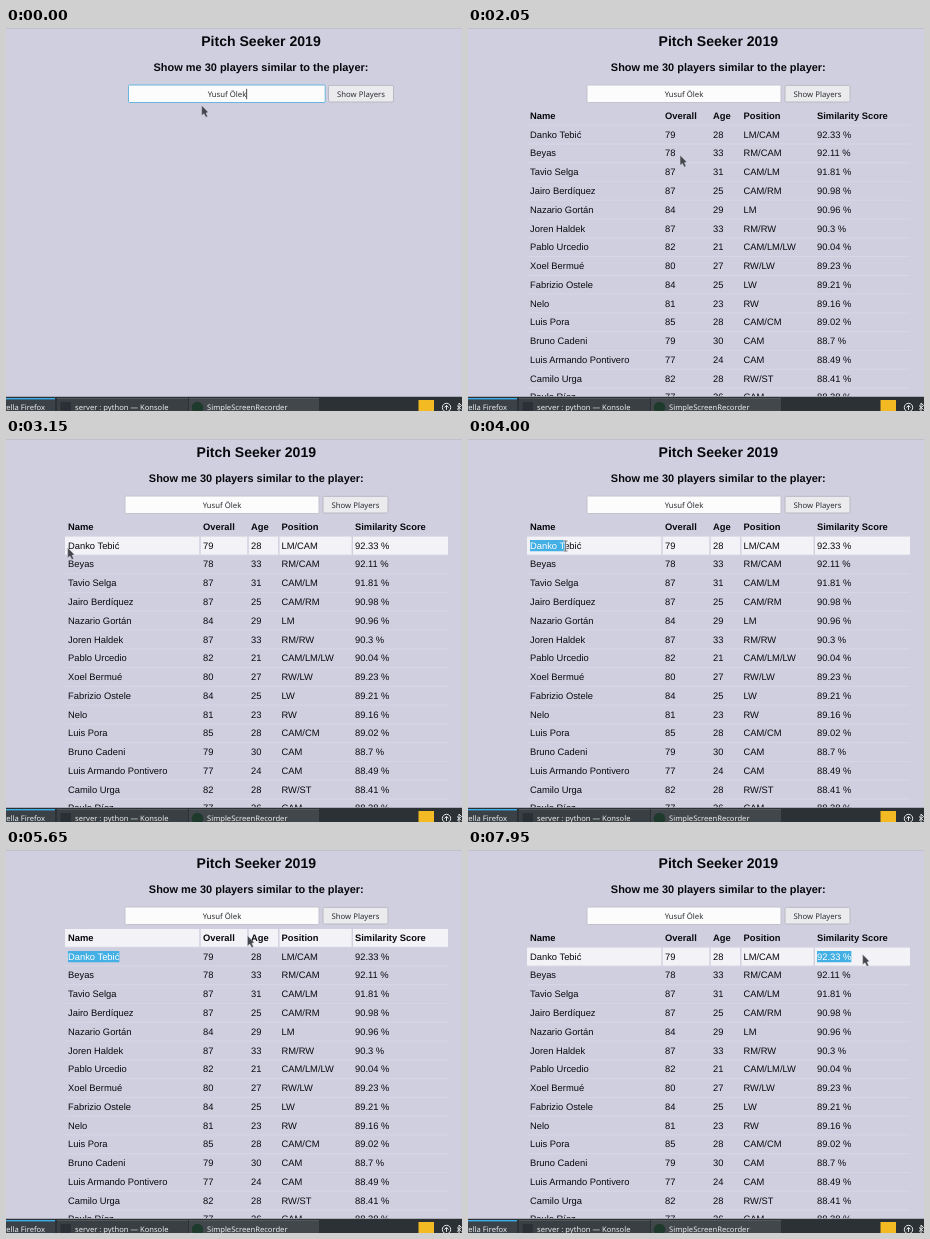
An HTML page for the animation above (8 s loop, 456 by 383 pixels).

```html
<!DOCTYPE html>
<html lang="en">
<head>
<meta charset="utf-8">
<title>Pitch Seeker</title>
<style>
  html, body { margin: 0; width: 100%; height: 100%; overflow: hidden; background: #d0cfe0; }
  #stage { display: block; width: 456px; height: 383px; }
  text {
    font: 9.37px "Liberation Sans", Arial, sans-serif;
    fill: #08080c; white-space: pre; text-rendering: geometricPrecision;
  }
  .bold { font-weight: bold; }
  .title { font-size: 14.05px; }
  .subtitle { font-size: 10.96px; }
  .ui { font: 7.75px "Noto Sans", sans-serif; fill: #2b2f33; }
  .task { font: 7.6px "Noto Sans", sans-serif; fill: #eceeef; }
  .mid { text-anchor: middle; }
  .end { text-anchor: end; }
  .picked text { fill: #fff; }
</style>
</head>
<body>
<svg id="stage" viewBox="0 0 456 383"></svg>
<script>
const DURATION = 8000, STEP = 50;
const BLUR = 800, TABLE = 950, FILL = 2000, HOVER = 2600;
const TOP = 79, FIRST = 97.2, PITCH = 18.77;

const heads = ['Name', 'Overall', 'Age', 'Position', 'Similarity Score'];
const players = `Danko Tebić|79|28|LM/CAM|92.33
Beyas|78|33|RM/CAM|92.11
Tavio Selga|87|31|CAM/LM|91.81
Jairo Berdíquez|87|25|CAM/RM|90.98
Nazario Gortán|84|29|LM|90.96
Joren Haldek|87|33|RM/RW|90.3
Pablo Urcedio|82|21|CAM/LM/LW|90.04
Xoel Bermué|80|27|RW/LW|89.23
Fabrizio Ostele|84|25|LW|89.21
Nelo|81|23|RW|89.16
Luis Pora|85|28|CAM/CM|89.02
Bruno Cadeni|79|30|CAM|88.7
Luis Armando Pontivero|77|24|CAM|88.49
Camilo Urga|82|28|RW/ST|88.41
Paulo Ríoz|77|26|CAM|88.38`.split('\n').map(line => (line + ' %').split('|'));

const wide = { text: [62, 119, 187, 230, 308], edges: [58.3, 115.5, 183.5, 227, 304.5, 442.7] };
const full = { text: [62, 197, 245, 275.5, 349], edges: [58.3, 194, 242, 272.8, 346.3, 442.7] };

// time, x, y
const path = [
  [0, 196, 78], [150, 196, 78], [650, 368, 66], [900, 372, 67], [1150, 380, 80],
  [1700, 330, 105], [2200, 180, 134], [2550, 170, 136.5], [2850, 48, 112],
  [3150, 62, 109.3], [3500, 62, 107], [4300, 114, 107], [4600, 118, 104],
  [5050, 121, 104], [5250, 125, 103], [5550, 220, 86], [5900, 330, 88],
  [6250, 352, 102], [6800, 349, 105], [7000, 349, 106], [7550, 384, 106],
  [7700, 395, 105], [8000, 395, 105]
];

const stage = document.getElementById('stage');

function add(parent, tag, attrs = {}, content) {
  const el = document.createElementNS('http://www.w3.org/2000/svg', tag);
  set(el, attrs);
  if (content !== undefined) el.textContent = content;
  parent.append(el);
  return el;
}
function set(el, attrs) {
  for (const key in attrs) el.setAttribute(key, attrs[key]);
}
const label = (parent, x, y, str, cls = '') => add(parent, 'text', { x, y, class: cls }, str);
const box = (parent, x, y, width, height, fill, more = {}) =>
  add(parent, 'rect', { x, y, width, height, fill, ...more });
const show = (el, on) => { el.style.display = on ? '' : 'none'; };

function cells(parent, edges, y, height) {
  const group = add(parent, 'g');
  for (let i = 0; i < 5; i++)
    box(group, edges[i] + .7, y, edges[i + 1] - edges[i] - 1.4, height, '#f3f2f6');
  return group;
}

function selection(parent, x, str) {
  const view = add(parent, 'svg', { x, y: 101, width: 0, height: 11.3, class: 'picked' });
  box(view, 0, 0, 80, 12, '#42afe5');
  const text = label(view, 0, 8.8, str);
  return { view, length: text.getComputedTextLength() };
}

// Page
box(stage, 0, 0, 456, 383, '#d0cfe0');
box(stage, 0, 0, 456, .6, '#b8b8c4');
const heading = add(stage, 'g');
label(heading, 255, 18, 'Pitch Seeker 2019', 'bold title mid');
label(heading, 255, 43.4, 'Show me 30 players similar to the player:', 'bold subtitle mid');

const field = box(stage, 0, 57, 0, 17.5, '#fcfcfc', { rx: 1.2 });
const fieldText = label(stage, 0, 68.9, 'Yusuf Ölek', 'ui mid');
const caret = box(stage, 240.3, 60.8, .8, 10.4, '#222');
const button = add(stage, 'g');
const face = box(button, 322.5, 57.3, 65, 16.7, '#ebebee', { rx: 1.5, stroke: '#b9b8c2' });
label(button, 355, 68.9, 'Show Players', 'ui mid');

// Header while waiting for the rows
const waiting = add(stage, 'g');
const waitingHover = cells(waiting, wide.edges, 79.7, 290);
heads.forEach((str, i) => label(waiting, wide.text[i], 257.4, str, 'bold'));

// Filled table
const table = add(stage, 'g');
players.forEach((_, i) => box(table, 59, FIRST - .4 + i * PITCH, 383, .8, '#d9d8e5'));
const hovers = [cells(table, full.edges, TOP, 17.8)];
players.forEach((_, i) => hovers.push(cells(table, full.edges, FIRST + .5 + i * PITCH, 17.9)));
heads.forEach((str, i) => label(table, full.text[i], 91.2, str, 'bold'));
players.forEach((row, r) =>
  row.forEach((str, i) => label(table, full.text[i], FIRST + 12.5 + r * PITCH, str)));
const namePick = selection(table, full.text[0], players[0][0]);
const scorePick = selection(table, full.text[4], players[0][4]);

// Taskbar
const bar = add(stage, 'g');
box(bar, 0, 368.2, 456, 1, '#a2a3ae');
box(bar, 0, 369, 456, 14, '#2c3136');
box(bar, 0, 370.5, 49, 13, '#3a4147');
box(bar, 0, 370, 49, 1.4, '#3daee9');
box(bar, 51, 370.5, 131, 13, '#3a3f44');
box(bar, 183, 370.5, 130, 13, '#42474c');
box(bar, 51, 370, 131, .8, '#5b6065');
box(bar, 183, 370, 130, .8, '#5b6065');
label(bar, 39, 382.3, 'vella Firefox', 'task end');
box(bar, 54.5, 374, 10.5, 9, '#2a3036', { rx: 1 });
label(bar, 69, 382.3, 'server : python — Konsole', 'task');
add(bar, 'circle', { cx: 191.5, cy: 379.5, r: 5.8, fill: '#1d3a2c' });
label(bar, 201, 382.3, 'SimpleScreenRecorder', 'task');
box(bar, 412.5, 372, 15.5, 11, '#f3ba24');
add(bar, 'circle', { cx: 440.5, cy: 379.5, r: 4.2, fill: 'none', stroke: '#e4e6e7', 'stroke-width': 1 });
add(bar, 'path', { d: 'M438.5 379.5l2-2.2 2 2.2M440.5 377.5v4.4', fill: 'none', stroke: '#e4e6e7' });
add(bar, 'path', { d: 'M451 377.5l4.5 4M451 381.5l4.5-4-2.5-2.5v8', fill: 'none', stroke: '#e4e6e7' });

// Pointer
const pointer = add(stage, 'g');
const arrow = add(pointer, 'path', {
  d: 'M-.3-.6V9.4L2 7.7 3.9 11.2 5.6 10.4 4 7 6.3 6.2Z',
  fill: '#43474d', stroke: '#d9d8e3', 'stroke-width': .4
});
const beam = add(pointer, 'g', { fill: 'none' });
for (const [stroke, width] of [['#f6f6f8', 1.8], ['#55595e', .8]])
  add(beam, 'path', { d: 'M-2-5H2M0-5V5M-2 5H2', stroke, 'stroke-width': width });

function pointerAt(t) {
  const i = Math.max(1, path.findIndex(p => p[0] > t));
  const [t0, x0, y0] = path[i - 1], [t1, x1, y1] = path[i];
  const u = (t - t0) / (t1 - t0), k = u * u * (3 - 2 * u);
  return [x0 + (x1 - x0) * k, y0 + (y1 - y0) * k];
}

function draw(t) {
  const [x, y] = pointerAt(t);
  const loaded = t >= TABLE, filled = t >= FILL, focused = t < BLUR;
  const inTable = x > 59 && x < 442 && y >= 79.5;

  set(heading, { transform: `translate(${loaded ? -4.7 : 0} 0)` });
  set(button, { transform: `translate(${loaded ? -5.5 : 0} 0)` });
  set(field, {
    x: loaded ? 119 : 122.5, width: loaded ? 194 : 196.7,
    stroke: focused ? '#69b5dd' : '#c3c2cd'
  });
  set(fieldText, { x: loaded ? 216 : 221 });
  show(caret, focused);
  const overButton = !loaded && x > 322 && y < 74;
  set(face, { stroke: overButton ? '#83bfe0' : '#b9b8c2' });

  show(waiting, loaded && !filled);
  show(waitingHover, inTable);
  show(table, filled);
  const hovered = t >= HOVER && inTable ? Math.floor((y - TOP) / PITCH) : -1;
  hovers.forEach((el, i) => show(el, i === hovered));

  const nameWidth = t >= 3500 && t < 6900 ? Math.min(x - 62, namePick.length) : 0;
  const scoreWidth = t >= 7000 ? Math.min(x - 349, scorePick.length) : 0;
  set(namePick.view, { width: Math.max(0, nameWidth) });
  set(scorePick.view, { width: Math.max(0, scoreWidth) });

  const overField = !loaded && x < 319 && y < 75;
  const overCell = hovered === 1 && (x > 63 && x < 114 || x >= 349 && x < 383);
  show(beam, overField || overCell);
  show(arrow, !(overField || overCell));
  set(pointer, { transform: `translate(${x} ${y})` });
}

const start = performance.now();
function tick() {
  const elapsed = (performance.now() - start) % DURATION;
  draw(Math.floor(elapsed / STEP) * STEP);
  requestAnimationFrame(tick);
}
tick();
</script>
</body>
</html>
```
